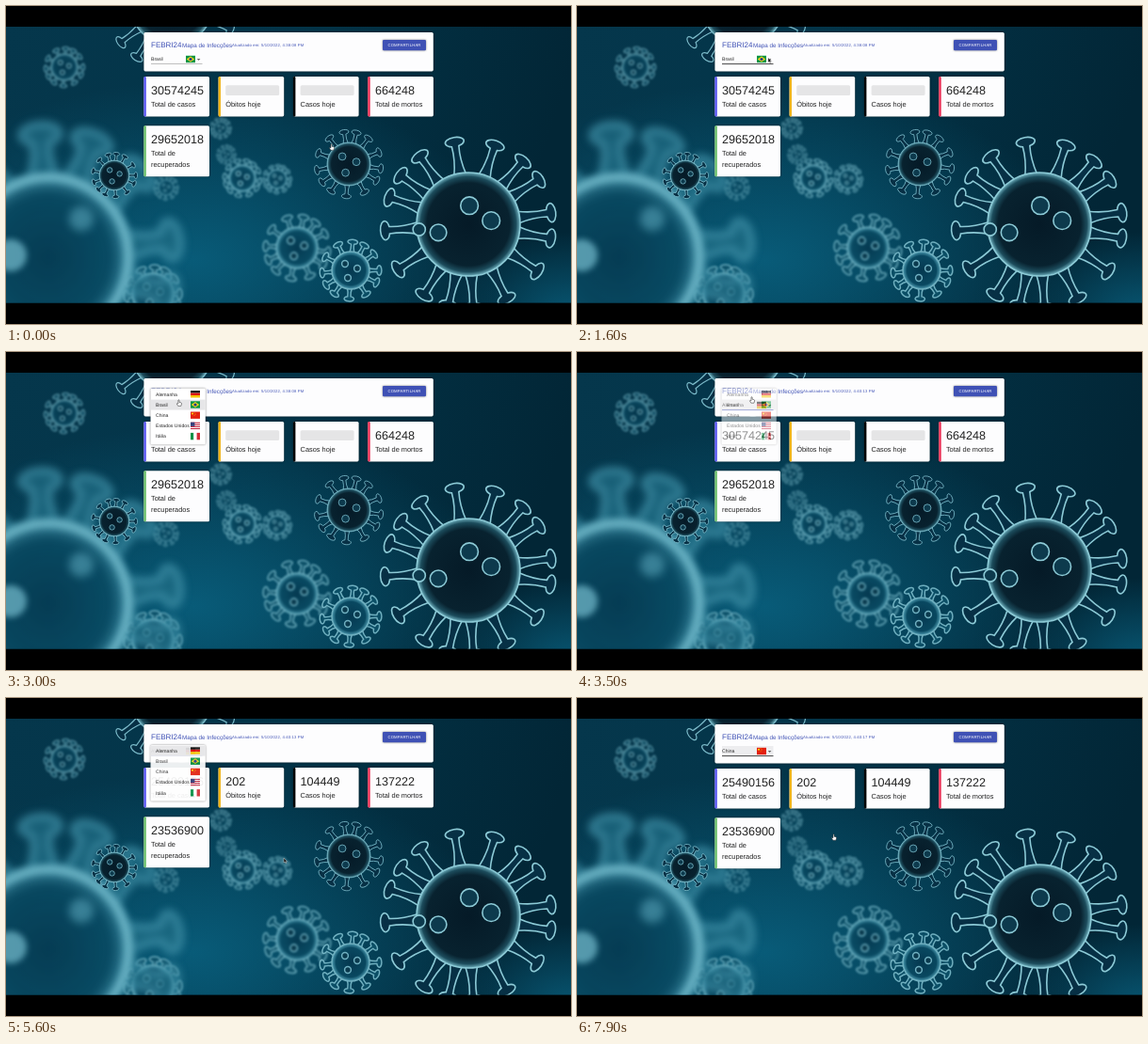
Animation of 600 by 338 pixels, one loop 8000 ms. Source, as an HTML page:

```html
<!DOCTYPE html>
<html lang="pt">
<head>
<meta charset="utf-8">
<title>Painel</title>
<style>
  html, body { margin: 0; width: 100%; height: 100%; overflow: hidden; background: #000; }
  svg { display: block; width: 600px; height: 338px; }
  text { font-family: "Liberation Sans", Arial, sans-serif; text-rendering: geometricPrecision; fill: #222; }
  .shadow { filter: drop-shadow(0 .6px .8px #0007); }
</style>
</head>
<body>
<svg viewBox="0 0 600 338">
  <defs>
    <linearGradient id="sea" x2="1" y2=".15">
      <stop offset="0" stop-color="#05374c"/>
      <stop offset=".5" stop-color="#033448"/>
      <stop offset="1" stop-color="#022636"/>
    </linearGradient>
    <radialGradient id="glow">
      <stop offset="0" stop-color="#0a6888" stop-opacity=".75"/>
      <stop offset="1" stop-color="#0a6888" stop-opacity="0"/>
    </radialGradient>
    <radialGradient id="dark">
      <stop offset="0" stop-color="#051a27"/>
      <stop offset=".8" stop-color="#08222f"/>
      <stop offset=".92" stop-color="#1c4c5c"/>
      <stop offset="1" stop-color="#6fb0be"/>
    </radialGradient>
    <radialGradient id="mist">
      <stop offset="0" stop-color="#06384f"/>
      <stop offset=".78" stop-color="#0a4a62"/>
      <stop offset="1" stop-color="#5aa9be"/>
    </radialGradient>
    <clipPath id="stage"><rect y="22" width="600" height="293.5"/></clipPath>
  </defs>
  <g id="photo" clip-path="url(#stage)"></g>
  <g id="ui"></g>
</svg>
<script>
const LOOP = 8000, STEP = 100;
const $ = id => document.getElementById(id);
const rect = (x, y, w, h, fill, more = '') =>
  `<rect x="${x}" y="${y}" width="${w}" height="${h}" fill="${fill}" ${more}/>`;
const disc = (x, y, r, fill, more = '') => `<circle cx="${x}" cy="${y}" r="${r}" fill="${fill}" ${more}/>`;
const text = (x, y, size, str, more = '') => `<text x="${x}" y="${y}" font-size="${size}" ${more}>${str}</text>`;
const glow = (x, y, rx, ry) => `<ellipse cx="${x}" cy="${y}" rx="${rx}" ry="${ry}" fill="url(#glow)"/>`;

// ---- background ----
function virus({ x, y, r, reach, n, turn = 0, stem, knob, line = 1, blur = 0, ink = '#7cbccb', fill = 'dark', tip = '#073045', alpha = 1, dots = [] }) {
  const neck = reach - knob * .8, mid = (r + neck) / 2;
  let out = `<g transform="translate(${x} ${y})" stroke="${ink}" stroke-width="${line}" opacity="${alpha}" style="filter:blur(${blur}px)">`;
  for (let i = 0; i < n; i++) {
    out += `<path transform="rotate(${turn + i * 360 / n + 5 * Math.sin(i * 5)})" fill="${tip}" d="M${r - 2} ${-stem * 1.7}
      Q${mid} ${-stem * .6} ${neck} ${-stem}A${knob * .5} ${knob} 0 1 1 ${neck} ${stem}Q${mid} ${stem * .6} ${r - 2} ${stem * 1.7}"/>`;
  }
  out += disc(0, 0, r, `url(#${fill})`);
  for (const [dx, dy, s] of dots) out += disc(dx * r, dy * r, s * r, '#0d3a4d');
  return out + '</g>';
}

const face = [[-.3, -.35, .17], [.35, -.1, .17], [-.15, .4, .17]];
const soft = (x, y, r, reach, blur, alpha, turn = 0) =>
  virus({ x, y, r, reach, n: 12, turn, stem: r * .08, knob: r * .26, line: 1.5, blur, alpha, fill: 'mist', tip: '#0d5068', dots: face });
const sharp = (x, y, r, reach, turn) =>
  virus({ x, y, r, reach, n: 13, turn, stem: r * .07, knob: r * .22, line: .8, dots: face });

$('photo').innerHTML = rect(0, 22, 600, 294, 'url(#sea)') +
  glow(200, 270, 330, 190) + glow(600, 330, 130, 90) +
  soft(62, 65, 14, 21, .9, .6) +
  soft(228, 130, 7, 11, 1, .45) +
  soft(234, 158, 6, 10, 1, .4) +
  soft(251, 183, 14, 20, .9, .75, 10) +
  soft(288, 184, 10, 15, 1, .6) +
  soft(170, 193, 8, 13, 1.2, .4) +
  soft(309, 257, 22, 35, .8, .85, 8) +
  soft(366, 281, 20, 32, .7, .9) +
  soft(156, 306, 22, 30, 1, .85) +
  virus({ x: 45, y: 267, r: 86, reach: 138, n: 12, turn: -8, stem: 9, knob: 20, line: 9, blur: 4, ink: '#3f8fa6', fill: 'mist', tip: '#1d6a82', alpha: .75 }) +
  disc(45, 267, 85, 'none', 'stroke="#7cc3d3" stroke-width="9" opacity=".75" style="filter:blur(3.5px)"') +
  disc(5, 265, 17, '#6fb6c8', 'opacity=".75" style="filter:blur(3px)"') +
  disc(80, 226, 13, '#5aa6bb', 'opacity=".6" style="filter:blur(5px)"') +
  virus({ x: 176, y: -2, r: 44, reach: 70, n: 15, turn: 4, stem: 2.6, knob: 7, line: 1.2 }) +
  sharp(115, 180, 16, 24, 0) +
  sharp(364, 168, 23, 36, 8) +
  virus({ x: 491, y: 232, r: 55, reach: 92, n: 16, turn: -8, stem: 3.8, knob: 10, line: 1.6, ink: '#8ccad6',
    dots: [[.02, -.36, .17], [.44, -.07, .17], [-.58, .16, .16], [-.95, .1, .12]] });

// ---- interface ----
const flags = {
  Alemanha: rect(0, 0, 10, 2.5, '#111') + rect(0, 2.5, 10, 2.4, '#dd1111') + rect(0, 4.9, 10, 2.5, '#f6c400'),
  Brasil: rect(0, 0, 10, 7.4, '#0b9444') + '<path d="M5 .8L9.2 3.7 5 6.6.8 3.7z" fill="#f7d618"/>' + disc(5, 3.7, 1.6, '#243a8c'),
  China: rect(0, 0, 10, 7.4, '#e3200f') + disc(2, 2, 1, '#fd0') +
    [[4, .9], [5, 1.8], [5, 3], [4, 4]].map(([x, y]) => disc(x, y, .4, '#fd0')).join(''),
  'Estados Unidos': rect(0, 0, 10, 7.4, '#fff') +
    [0, 1, 2, 3].map(i => rect(0, i * 2.1, 10, 1.05, '#c4203a')).join('') + rect(0, 0, 4.4, 4.2, '#36417c'),
  'Itália': rect(0, 0, 3.4, 7.4, '#0a9246') + rect(3.4, 0, 3.2, 7.4, '#fff') + rect(6.6, 0, 3.4, 7.4, '#d22f37')
};
const flag = (name, x, y) => `<g transform="translate(${x} ${y})">${flags[name]}</g>`;

const menus = [ // open, close, vertical shift, chosen row
  { from: 2600, to: 3400, dy: -11.2, pick: 'Brasil' },
  { from: 4500, to: 5585, dy: 0, pick: 'Alemanha' },
  { from: 6650, to: 7150, dy: 0, pick: 'Alemanha' }
];
const pointer = [ // time, x, y
  [0, 346, 150], [800, 204, 57], [1700, 204, 57], [2300, 180, 60], [2700, 180, 60], [3200, 186, 51],
  [3500, 186, 51], [4200, 192, 58], [4800, 192, 58], [5500, 296, 172], [5700, 296, 172],
  [6500, 204, 57], [6750, 204, 57], [7050, 188, 78], [7200, 188, 78], [7800, 273, 148], [8000, 273, 148]
];
const clamp = v => Math.max(0, Math.min(1, v));
const between = (t, a, b) => t >= a && t < b;

function drawMenu(t, { from, to, dy, pick }) {
  const enter = clamp((t - from) / 120), leave = clamp((t - to) / 200);
  const alpha = Math.min(enter, 1 - leave);
  if (alpha <= 0) return '';
  const grow = 1 - (1 - enter) ** 2;
  const rows = Object.keys(flags).map((name, i) => {
    const y = 56 + i * 11.2;
    return (name === pick ? rect(153.5, y - 5.4, 58.3, 11, '#e6e6e8') : '') +
      text(159, y + 1.8, 5.1, name) + flag(name, 196, y - 3.7);
  }).join('');
  return `<g opacity="${alpha}" transform="translate(153.5 ${56 + dy}) scale(${.75 + .25 * grow} ${.56 + .44 * grow}) translate(-153.5 -56)">
    ${rect(153.5, 50, 58.3, 59.5, '#fff', 'rx="1.5" class="shadow"')}${rows}</g>`;
}

function drawCard(x, y, h, color, value, labels, pulse) {
  return rect(x, y, 69.6, h, '#fdfdfe', 'rx="1.6" class="shadow"') + rect(x, y, 2.4, h, color, 'rx="1"') +
    (value ? text(x + 7.6, y + 18.7, 12.6, value)
           : rect(x + 7.6, y + 9.2, 57, 10.8, '#000', `rx="1.6" opacity="${pulse}"`)) +
    labels.map((s, i) => text(x + 7.6, y + 31.8 + i * 11.5, 7.4, s)).join('');
}

function drawPointer(t) {
  const i = pointer.findIndex(p => p[0] > t), [t0, x0, y0] = pointer[i - 1], [t1, x1, y1] = pointer[i];
  const p = (t - t0) / (t1 - t0), k = p * p * (3 - 2 * p);
  const arrow = between(t, 600, 2000) || between(t, 5000, 6800);
  const [shape, fill, edge] = arrow
    ? ['M-1 -2V3L.2 2 1 3.8 1.8 3.4 1.1 1.8H2.6z', '#111', '#ccc']
    : ['M-1 -3Q-.4 -3.6 .1 -3V-.8L2 -.3Q2.7 0 2.6 .8L2 3.2H-1.2L-2.6 .8Q-2.4 0 -1 .8z', '#fff', '#222'];
  return `<path transform="translate(${x0 + (x1 - x0) * k} ${y0 + (y1 - y0) * k})" d="${shape}"
    fill="${fill}" stroke="${edge}" stroke-width=".5"/>`;
}

function draw(t) {
  const country = t < 3400 ? 'Brasil' : t < 7100 ? 'Alemanha' : 'China';
  const clock = t < 3400 ? '4:38:08' : t < 7300 ? '4:40:13' : '4:40:17';
  const loaded = t >= 3900;
  const pick = (before, after) => loaded ? after : before;
  const phase = (t < 3400 ? t : t - 3400) / 1500;
  const pulse = .065 + .03 * Math.cos(phase * 2 * Math.PI);
  const lift = between(t, 2700, 7300) ? 1 : 0;
  const focus = menus.some(m => between(t, m.from, m.to + 200));
  const hover = between(t, 800, 2700) || t >= 7300;
  const top = 75 - lift;
  const blue = 'style="fill:#3f51b5"';

  $('ui').innerHTML =
    rect(146.4, 28, 307.4, 41.4 - lift, '#fdfdfe', 'rx="1.6" class="shadow"') +
    text(154, 43.5, 8, 'FEBRI24', blue) +
    text(187, 43.5, 6.3, 'Mapa de Infecções', blue) +
    text(240, 43.3, 4.2, `Atualizado em: 5/10/2022, ${clock} PM`, blue + ' letter-spacing=".14"') +
    rect(400, 36, 46, 11.3, '#3f51b5', 'rx="1.2" class="shadow"') +
    text(423, 43.3, 4.3, 'COMPARTILHAR', 'text-anchor="middle" letter-spacing=".12" style="fill:#fff"') +
    (between(t, 2200, 2700) || t >= 7300 ? rect(154, 51, 54.5, 10.5, '#ededef') : '') +
    rect(154, 61.2, 54.5, focus || hover ? .9 : .55, focus ? '#3f51b5' : hover ? '#333' : '#8d8d8d') +
    text(154, 57.8, 5.1, country) + flag(country, 191, 52.8) +
    '<path d="M202.8 56H206.4L204.6 57.9z" fill="#666"/>' +
    drawCard(146.4, top, 42.4, '#5754f3', pick('30574245', '25490156'), ['Total de casos']) +
    drawCard(225.6, top, 42.4, '#f2b61c', pick('', '202'), ['Óbitos hoje'], pulse) +
    drawCard(305, top, 42.4, '#050505', pick('', '104449'), ['Casos hoje'], pulse) +
    drawCard(384.3, top, 42.4, '#ee2f55', pick('664248', '137222'), ['Total de mortos']) +
    drawCard(146.4, top + 52.3, 54, '#6abf69', pick('29652018', '23536900'), ['Total de', 'recuperados']) +
    menus.map(m => drawMenu(t, m)).join('') +
    drawPointer(t);
}

const start = performance.now();
let shown = -1;
function tick() {
  const t = Math.floor((performance.now() - start) % LOOP / STEP) * STEP;
  if (t !== shown) draw(shown = t);
  requestAnimationFrame(tick);
}
tick();
</script>
</body>
</html>
```
